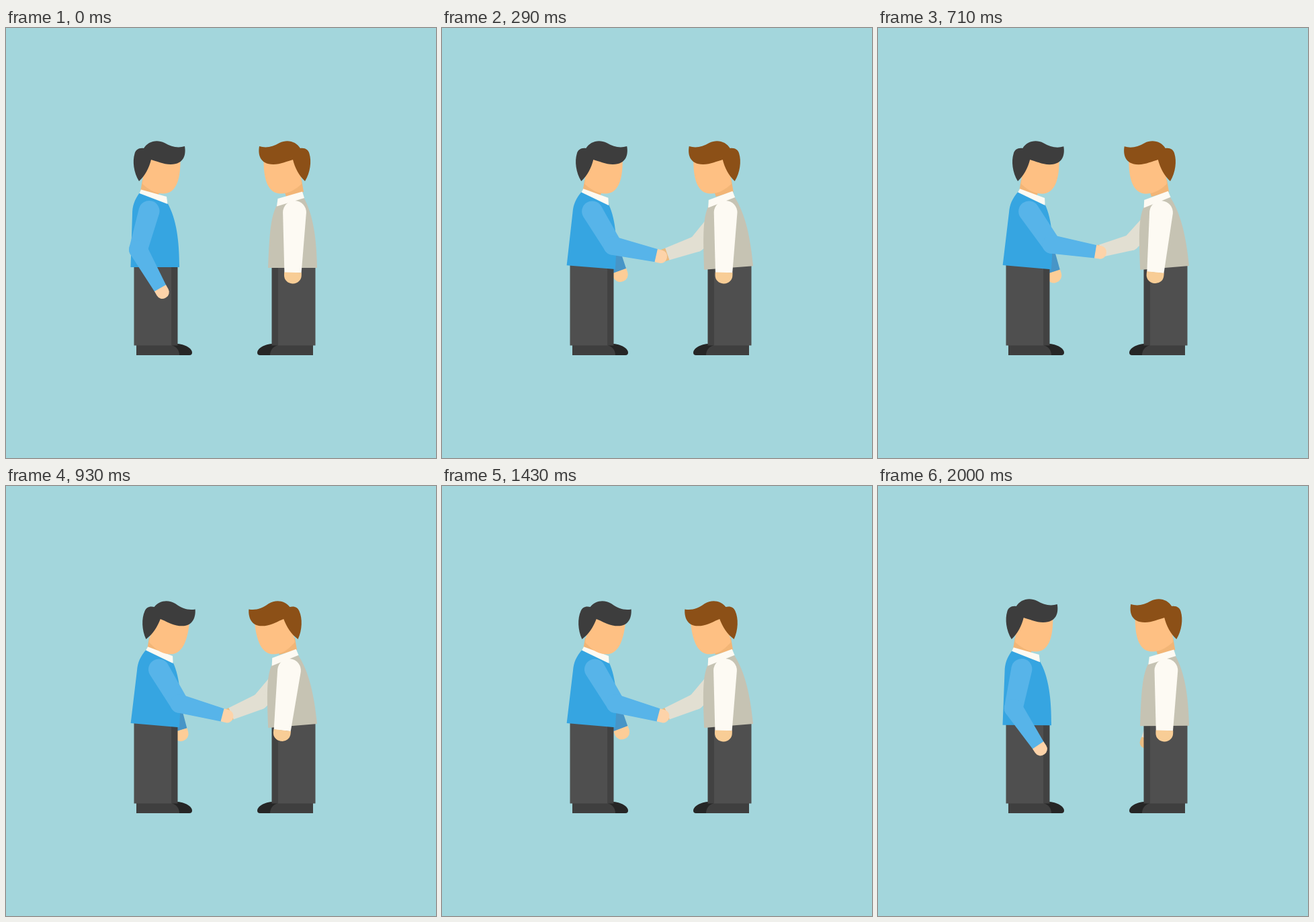
Animation, 640 px wide and 640 px high, one loop 2070 ms. Source, as an HTML page with a canvas:

```html
<!DOCTYPE html>
<html lang="en">
<head>
<meta charset="utf-8">
<title>Handshake</title>
<style>
html, body { margin: 0; width: 100%; height: 100%; overflow: hidden; background: #a3d6dc; }
canvas { display: block; width: 640px; height: 640px; }
</style>
</head>
<body>
<canvas id="stage" width="640" height="640"></canvas>
<script>
const ctx = document.getElementById('stage').getContext('2d');
const LOOP = 2070, FPS = 14, STEPS = 29;
const RAD = Math.PI / 180;

const shapes = {
  hair: 'M198 228C190 215 188 198 191.5 187C193 181 198 178 205 179C211 169 224 165 236 171C246 177 256 179 266 176C268 187 266 203 245 203C234 203 224 198 216 196C213 208 207 220 198 228Z',
  face: 'M206 195H259.5V201C259 226 253 246.5 234 246.5C221 246.5 212 240 203 232Z',
  neck: 'M203 226L200 244L226 251L231 236Z',
  sweater: 'M199 245C191 256 188 265 188 277L185.5 356H258C258 318 254 284 240 260Z',
  sweaterCollar: 'M201 240.5L239 251L240.5 262L198.5 246Z',
  vest: 'M403 264C394 281 392 305 390 357H463C462 314 458 280 443 252Z',
  vestCollar: 'M404.5 254L441 243.5L444 253L403 265.5Z',
  farShoe: 'M214 487V473L250 470C266 469 277 477 277 483Q277 487 273 487Z',
  nearShoe: 'M194 472H246C254 474 258 480 258 487H194Z',
  trousers: 'M190.5 345H247V472.5H190.5Z',
  farTrouser: 'M246 345H255.5V472.5H246Z'
};
for (const key in shapes) shapes[key] = new Path2D(shapes[key]);

const mix = (a, b, t) => a + (b - a) * t;
const clamp = t => Math.min(1, Math.max(0, t));
const smooth = t => { t = clamp(t); return t * t * (3 - 2 * t); };

function paint(name, color) {
  ctx.fillStyle = color;
  ctx.fill(shapes[name]);
}

function layer(draw) {
  ctx.save();
  draw();
  ctx.restore();
}

function rotateAt(x, y, angle) {
  ctx.translate(x, y);
  ctx.rotate(angle);
  ctx.translate(-x, -y);
}

function flip(axisSum) {
  ctx.translate(axisSum, 0);
  ctx.scale(-1, 1);
}

// Tapered limb: round at the start, cut straight at the end.
function limb(x, y, deg, length, r0, r1) {
  layer(() => {
    ctx.translate(x, y);
    ctx.rotate(deg * RAD);
    ctx.beginPath();
    ctx.arc(0, 0, r0, Math.PI / 2, Math.PI * 1.5);
    ctx.lineTo(length, -r1);
    ctx.lineTo(length, r1);
    ctx.fill();
  });
  return [x + length * Math.cos(deg * RAD), y + length * Math.sin(deg * RAD)];
}

function hand(x, y, deg, half, length, color) {
  layer(() => {
    ctx.translate(x, y);
    ctx.rotate(deg * RAD);
    ctx.fillStyle = color;
    ctx.beginPath();
    const r = Math.min(half, length) - 0.5;
    ctx.roundRect(-0.5, -half, length + 0.5, half * 2, [0, r, r, 0]);
    ctx.fill();
  });
}

function straightArm(x, y, deg, length, r0, r1, sleeve, skin) {
  ctx.fillStyle = sleeve;
  const [wx, wy] = limb(x, y, deg, length, r0, r1);
  hand(wx, wy, deg, r1 + 0.3, 16, skin);
}

function bentArm(arm) {
  const { x, y, upper, fore, lengths, radii, sleeve, skin, reach } = arm;
  ctx.fillStyle = sleeve;
  const [ex, ey] = limb(x, y, upper, lengths[0], radii[0], radii[1]);
  ctx.beginPath();
  ctx.arc(ex, ey, radii[1], 0, Math.PI * 2);
  ctx.fill();
  const [wx, wy] = limb(ex, ey, fore, lengths[1], radii[1], radii[2]);
  hand(wx, wy, fore, radii[2], reach, skin);
}

function legs() {
  paint('farShoe', '#262626');
  paint('nearShoe', '#3f3f3f');
  paint('trousers', '#4f4f4f');
  paint('farTrouser', '#424242');
}

function neck(lean) {
  layer(() => {
    ctx.translate(10 * lean, 0);
    paint('neck', '#f2b576');
  });
}

function head(lean, shake, hair) {
  layer(() => {
    ctx.translate(10 * lean, 0);
    rotateAt(199, 232, 0.108 * shake);
    paint('face', '#fec083');
    paint('hair', hair);
  });
}

function torso(body, collar, color, pivot, angle) {
  layer(() => {
    rotateAt(pivot, 356, angle * RAD);
    paint(body, color);
    paint(collar, '#fdfaf3');
  });
}

function pose(k) {
  return {
    lean: smooth(k / 4.8) * (1 - smooth((k - 20.2) / 9.4)),
    shake: k > 9.5 && k < 23.5 ? (1 + Math.cos((k - 13) / 7 * 2 * Math.PI)) / 2 : 0,
    swing: Math.sin(clamp((k - 6) / 14) * Math.PI)
  };
}

function draw(k) {
  const { lean, shake, swing } = pose(k);
  ctx.fillStyle = '#a3d6dc';
  ctx.fillRect(0, 0, 640, 640);

  straightArm(222 + 9 * lean, 270, 83 - 14 * lean + 4.5 * swing, 98, 14, 11, '#4795c7', '#fdcd97');
  bentArm({
    x: 427 - 7.5 * lean, y: 273 + 3 * lean,
    upper: mix(94, 135, lean) - 2 * shake,
    fore: mix(108, 165, lean) - 8 * shake,
    lengths: [61, 47], radii: [15, 12, 9.3],
    sleeve: '#e2dfd2', skin: '#eabb80', reach: 14
  });

  legs();
  layer(() => { flip(651); legs(); });

  neck(lean);
  torso('sweater', 'sweaterCollar', '#36a5e1', 221, 5 * lean);
  head(lean, shake, '#3d3d3d');

  layer(() => { flip(643); neck(lean); });
  torso('vest', 'vestCollar', '#c6c3b3', 426, -4.7 * lean);
  layer(() => { flip(643); head(lean, shake, '#8c5017'); });

  straightArm(429.5 - 8 * lean, 274.5, 91.6 + 5 * swing, 90, 17.4, 12.6, '#fdfaf3', '#f8cd96');
  bentArm({
    x: 213 + 11.5 * lean + 3 * shake, y: 272.5 + 0.5 * lean,
    upper: mix(105.7, 55.2, lean) + 3.7 * shake,
    fore: mix(60.4, 9.1, lean) + 5.7 * shake,
    lengths: [59.5, 66.5], radii: [15.5, 13.8, 9.8],
    sleeve: '#57b4e9', skin: '#fdd3a9', reach: 16
  });
}

const stepStart = k => Math.round(k * 100 / FPS) * 10;
const start = performance.now();
let shown = -1;

function tick() {
  const t = (performance.now() - start) % LOOP;
  let k = STEPS - 1;
  while (k > 0 && stepStart(k) > t) k--;
  if (k !== shown) draw(shown = k);
  requestAnimationFrame(tick);
}
tick();
</script>
</body>
</html>
```
